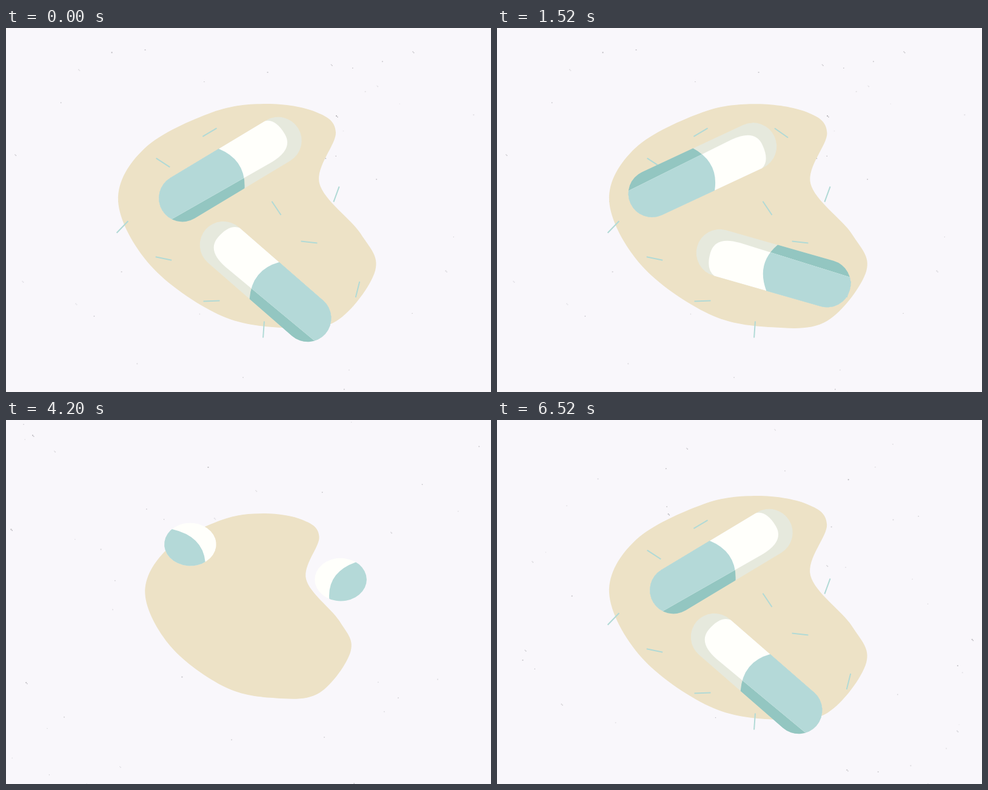
Recreate the animation shown at these times as an HTML page with a canvas. Size 800x600 px, loop 6600 ms.

```html
<!DOCTYPE html>
<html lang="en">
<head>
<meta charset="utf-8">
<title>Capsules</title>
<style>
  html, body { margin: 0; width: 100%; height: 100%; overflow: hidden; background: #f9f7fb; }
  canvas { display: block; width: 800px; height: 600px; }
</style>
</head>
<body>
<canvas id="stage" width="800" height="600"></canvas>
<script>
const ctx = document.getElementById('stage').getContext('2d');
const LOOP = 6600, WOBBLE = 1650, RADIUS = 39, LENGTH = 184, RAD = Math.PI / 180;

// Blob outline, clockwise from the top: x, y and how far each point wobbles
const outline = [[430,125,-25,3], [510,138,10,8], [544,172,7,11], [517,256,4,9], [585,339,5,7], [609,400,5,4],
  [545,483,-5,-3], [455,494,-15,-12], [350,472,-5,-9], [238,391,0,0], [185,285,1,-8], [229,198,-12,-4], [340,139,-10,-4]];

// Sticks: centre and angle
const sticks = [[336,172,-31], [259,222,33], [192,328,-46], [260,380,12], [339,450,-2], [425,497,94],
  [446,297,56], [500,353,6], [545,274,110], [580,431,104], [469,173,35]];

// Poses of each pill at the key times: x, y, angle from teal to white
const poseTimes = [0, 720, 1520, 3200, 4200, 5640, 6520, LOOP];
const pills = [
  { side: 1, openAt: 5640, poses: [[370,233,-31], [372,233,-30], [339,234,-25], [356,226,-65],
    [304,205,-38], [372,234,-41], [370,233,-31], [370,233,-31]] },
  { side: -1, openAt: 6200, poses: [[428,418,221], [422,419,222], [456,396,196], [430,483,210],
    [552,263,213], [423,411,392], [428,418,581], [428,418,581]] }
];

const mix = (a, b, p) => a + (b - a) * p;

// Eased rise from 0 to 1 between two times
function ramp(t, from, to) {
  const p = Math.min(1, Math.max(0, (t - from) / (to - from)));
  return (1 - Math.cos(Math.PI * p)) / 2;
}

// 1 when full size, 0 when shrunk to a ball
const openness = (t, openAt) => 1 - ramp(t, 1520, 3200) + ramp(t, 4200, openAt);

function seededRandom(seed) {
  return () => {
    seed = (seed * 16807) % 2147483647;
    return seed / 2147483647;
  };
}

function drawSpeckles(t) {
  const random = seededRandom(4217 * (Math.floor(t / 2000) + 1));
  for (let i = 0; i < 45; i++) {
    const x = random() * 800, y = random() * 600, size = 1 + random();
    ctx.fillStyle = `rgba(80,80,85,${mix(.12, .4, random())})`;
    ctx.fillRect(x, y, size, size);
    if (i % 4 === 0) ctx.fillRect(x + size, y + size, 1.5, 1.5);
  }
}

function drawBlob(t) {
  const open = openness(t, 5640);
  const wobble = open * (1 - Math.cos(2 * Math.PI * t / WOBBLE)) / 2;
  const points = outline.map(([x, y, dx, dy]) => [
    mix(407, x + dx * wobble, mix(.8, 1, open)),
    mix(291, y + dy * wobble, mix(.825, 1, open))
  ]);
  const at = i => points[(i + points.length) % points.length];
  ctx.beginPath();
  ctx.moveTo(...points[0]);
  points.forEach((p, i) => {
    const before = at(i - 1), next = at(i + 1), after = at(i + 2);
    ctx.bezierCurveTo(p[0] + (next[0] - before[0]) / 6, p[1] + (next[1] - before[1]) / 6,
      next[0] - (after[0] - p[0]) / 6, next[1] - (after[1] - p[1]) / 6, ...next);
  });
  ctx.fillStyle = '#ede2c6';
  ctx.fill();
}

function drawSticks(t) {
  const phase = t / WOBBLE % 1;
  if (phase > .52 && phase < .7) return;
  const turn = phase > .3 && phase <= .52 ? 80 : 0;
  ctx.strokeStyle = '#b1dad6';
  ctx.lineWidth = 2;
  ctx.beginPath();
  for (const [x, y, angle] of sticks) {
    const a = (angle + turn) * RAD;
    const dx = Math.cos(a) * 13.5, dy = Math.sin(a) * 13.5;
    ctx.moveTo(x - dx, y - dy);
    ctx.lineTo(x + dx, y + dy);
  }
  ctx.stroke();
}

function tealPath(half, shift) {
  const path = new Path2D();
  path.moveTo(-half - 60, -60);
  path.lineTo(shift, -60);
  path.lineTo(shift + 1, -RADIUS);
  path.quadraticCurveTo(shift + 30, 0, shift + 4, RADIUS);
  path.lineTo(shift, 60);
  path.lineTo(-half - 60, 60);
  return path;
}

// The part of the body outside the shade; the sign of shade picks the long edge
function litPath(half, shade) {
  const amount = Math.abs(shade), side = Math.sign(shade);
  const edge = RADIUS - 14 * amount, tip = half + RADIUS - 24 * amount;
  const path = new Path2D();
  path.moveTo(-half - 60, -60 * side);
  path.lineTo(-half - 60, (edge - 5 * amount) * side);
  path.lineTo(half - 27 * amount, edge * side);
  path.quadraticCurveTo(tip, edge * side, tip, -4 * amount * side);
  path.quadraticCurveTo(tip, (6 * amount - RADIUS) * side, half - 2 * amount, -RADIUS * side);
  path.lineTo(half - 2 * amount, -60 * side);
  return path;
}

function drawPill({ side, openAt, poses }, t) {
  const i = poseTimes.findIndex(time => time > t);
  const p = ramp(t, poseTimes[i - 1], poseTimes[i]);
  const [x, y, angle] = poses[i].map((v, n) => mix(poses[i - 1][n], v, p));
  const open = openness(t, openAt), half = LENGTH * open / 2;
  const roll = t < 3200 ? 1 - 2 * ramp(t, 720, 1520) : 1;
  const shade = side * roll * open;
  const stretch = 1 + (1 - open) * mix(-.07, .1, ramp(t, 3200, 4200));

  const teal = tealPath(half, -6 * (1 - open));
  const body = new Path2D();
  body.arc(-half, 0, RADIUS, Math.PI / 2, Math.PI * 1.5);
  body.arc(half, 0, RADIUS, -Math.PI / 2, Math.PI / 2);
  body.closePath();
  const fill = (path, color) => { ctx.fillStyle = color; ctx.fill(path); };

  ctx.save();
  ctx.translate(x, y);
  ctx.scale(stretch, 1 / stretch);
  ctx.rotate(angle * RAD);
  ctx.clip(body);
  if (Math.abs(shade) > .01) {
    fill(body, '#e6e9dd');
    fill(teal, '#93c6c1');
    ctx.clip(litPath(half, shade));
  }
  fill(body, '#fffffb');
  fill(teal, '#b4d9d8');
  ctx.restore();
}

// The picture advances every 80 ms, with one longer hold before 4200 ms
function stepTime(t) {
  return t < 4200 ? Math.min(4080, Math.floor(t / 80) * 80) : 4200 + Math.floor((t - 4200) / 80) * 80;
}

const start = performance.now();
function draw() {
  const t = stepTime(Math.max(0, performance.now() - start) % LOOP);
  ctx.fillStyle = '#f9f7fb';
  ctx.fillRect(0, 0, 800, 600);
  drawSpeckles(t);
  drawBlob(t);
  drawSticks(t);
  pills.forEach(pill => drawPill(pill, t));
  requestAnimationFrame(draw);
}
draw();
</script>
</body>
</html>
```
